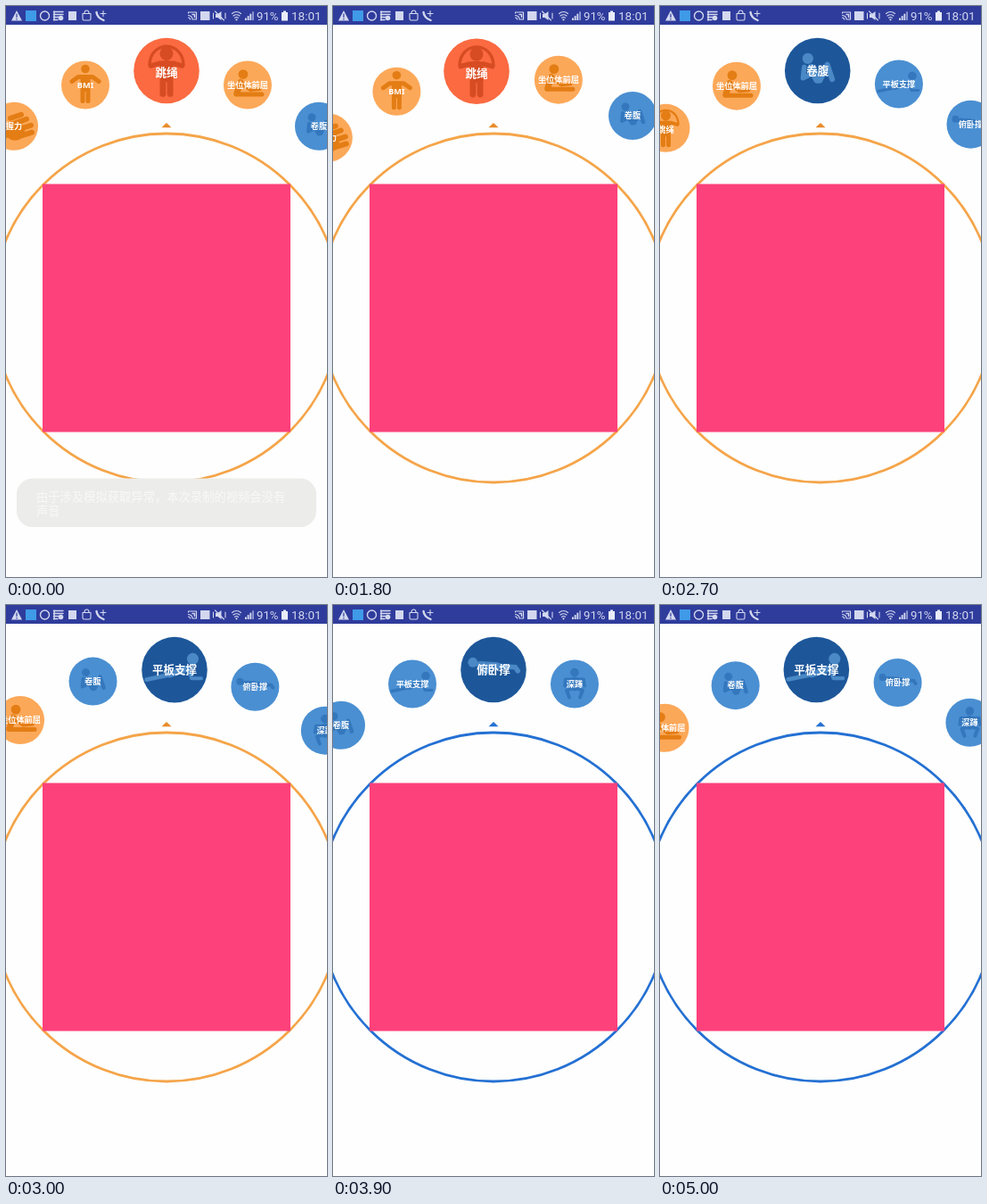
Animation of 360 by 640 pixels, one loop 5100 ms. Source, as an HTML page with a canvas:

```html
<!DOCTYPE html>
<html lang="zh">
<head>
<meta charset="utf-8">
<style>
html, body { margin: 0; width: 100%; height: 100%; overflow: hidden; background: #fdfefd; }
canvas { display: block; }
</style>
</head>
<body>
<canvas width="360" height="640"></canvas>
<script>
const ctx = document.querySelector('canvas').getContext('2d');
const LOOP = 5100, STEP = 100;
const CX = 180, CY = 338.5, ORBIT = 266, SPACING = 20 * Math.PI / 180;
const CJK = '"Noto Sans", "Noto Sans CJK SC", "Noto Sans CJK", sans-serif';

const WARM = { normal: ['#fca859', '#e37d14'], active: ['#fb6a41', '#d74c22'] };
const COOL = { normal: ['#4a8fd2', '#3477bd'], active: ['#1d579a', '#4a88c6'] };

// Figures fit a circle of radius 27: head [x, y, r] and strokes [width, path].
const ITEMS = [
  { label: '握力', tone: WARM, head: [1, 5, 11],
    limbs: [[6, 'M-4 -9L8 -13M0 -3L14 -8M4 4L19 -1M7 11L20 7M-14 14L-3 6']] },
  { label: 'BMI', tone: WARM, head: [0, -18, 4.8],
    limbs: [[5, 'M-15 -4L-8 -9H8L15 -4'], [11, 'M0 -6V2'], [5, 'M-3 4V18M3 4V18']] },
  { label: '跳绳', tone: WARM, head: [0, -14, 5.5], labelY: 1.5,
    limbs: [[2.4, 'M-14 -5C-13 -25 13 -25 14 -5'], [4, 'M-13 -4L-6 -6H6L13 -4'],
      [11, 'M0 -3V4'], [5, 'M-3 6V19M3 6V19']] },
  { label: '坐位体前屈', tone: WARM, head: [-5, -12, 5.4],
    limbs: [[7, 'M-8 -3L-12 9'], [5, 'M-13 10.5H16'], [3, 'M-7 -1L3 6L14 5']] },
  { label: '卷腹', tone: COOL, head: [-8, -10, 4.5],
    limbs: [[4, 'M-11 -3L-12 6L-4 2'], [7, 'M-5 -2L0 7'], [4.5, 'M2 8L8 -5L12 7']] },
  { label: '平板支撑', tone: COOL, head: [15, -9, 4.8],
    limbs: [[5, 'M11 -1L-4 4'], [3.5, 'M-4 4L-23 8'], [3, 'M12 0L14 7H22']] },
  { label: '俯卧撑', tone: COOL, head: [-17, -6, 4],
    limbs: [[6, 'M-11 -4L3 -3'], [4, 'M3 -3L18 -2L20 1'], [3, 'M-10 -3L-9 3L-4 1']] },
  { label: '深蹲', tone: COOL, head: [0, -13, 4.8],
    limbs: [[4, 'M-11 2L-10 -5H10L11 2'], [10, 'M0 -3V3'], [4, 'M-3 5L-9 7L-6 15M3 5L9 7L6 15']] }
];

// Wheel position, in items, at chosen times
const KEYS = [[0, 2], [1000, 2], [1800, 2.205], [2300, 2.903], [3000, 4.903],
  [3600, 6], [4100, 6], [4600, 5.48], [5000, 5.05], [5100, 4.95]];

const slope = i => {
  const a = KEYS[i], b = KEYS[i + 1];
  return a && b ? (b[1] - a[1]) / (b[0] - a[0]) : 0;
};
const tangent = i => {
  const a = slope(i - 1), b = slope(i);
  return a * b > 0 ? 2 * a * b / (a + b) : 0;
};

// Monotone cubic interpolation
function wheelPosition(t) {
  let i = 0;
  while (i < KEYS.length - 2 && t >= KEYS[i + 1][0]) i++;
  const [t0, a] = KEYS[i], [t1, b] = KEYS[i + 1];
  const d = t1 - t0, u = (t - t0) / d, u2 = u * u, u3 = u2 * u;
  return a * (2 * u3 - 3 * u2 + 1) + b * (3 * u2 - 2 * u3) +
    d * (tangent(i) * (u3 - 2 * u2 + u) + tangent(i + 1) * (u3 - u2));
}

function disc(x, y, r, color) {
  ctx.fillStyle = color;
  ctx.beginPath();
  ctx.arc(x, y, r, 0, 7);
  ctx.fill();
}

function line(path, color, width) {
  ctx.strokeStyle = color;
  ctx.lineWidth = width;
  ctx.stroke(new Path2D(path));
}

function shape(path, color) {
  ctx.fillStyle = color;
  ctx.fill(new Path2D(path));
}

function text(str, x, y, font, color, align = 'left') {
  ctx.font = font;
  ctx.fillStyle = color;
  ctx.textAlign = align;
  ctx.fillText(str, x, y);
}

function drawStatusBar() {
  const ink = '#d3d8ef', dim = '#8e98cf';
  ctx.fillStyle = '#2f3c9c';
  ctx.fillRect(0, 0, 360, 21);
  shape('M12 5L18 16.5H6Z', ink);
  line('M12 9V12.5M12 14.3V15', '#2f3c9c', 1.2);
  shape('M22 5h12v12h-12z', '#3f9ae8');
  line('M38.5 11a5 5 0 1 0 10 0a5 5 0 1 0 -10 0', ink, 1.4);
  line('M53.5 6.5H64M53.5 9.5H64M53.5 12.5H59M53.5 15.5H58M54 6V16', ink, 1.5);
  disc(61.5, 13.5, 2.8, ink);
  shape('M70 6h9v10h-9z', ink);
  line('M86 8.5H95V14.5Q95 16 93.500 16H87.5Q86 16 86 14.500ZM88 8Q88 5 90.500 5T93 8', ink, 1.1);
  line('M101.5 7Q102 13 109.5 16', ink, 2.4);
  line('M106 8.5H112M109 5.500V11.5', ink, 1.1);
  line('M204.500 8V7H213.5V15H210M204.500 10.500Q209 11 209 15M204.500 13Q206.500 13 206.500 15', ink, 1.2);
  line('M209 9.500H211.5V12.5', ink, 1.5);
  shape('M218 6h10.500v10h-10.500z', ink);
  shape('M235 9h2.500l4-3v10l-4-3h-2.500z', ink);
  line('M234.500 6L244.500 16M232.500 8V14M246 8V14', ink, 1.1);
  line('M253.500 8.500Q258.500 4.500 263.500 8.500M255 11Q258.500 8.500 262 11M256.500 13.200Q258.500 11.800 260.500 13.200', ink, 1.2);
  disc(258.5, 15.300, 1.1, ink);
  for (let i = 0; i < 4; i++) {
    ctx.fillStyle = i < 3 ? ink : dim;
    ctx.fillRect(268 + i * 2.7, 13.500 - i * 2.4, 1.9, 2.5 + i * 2.4);
  }
  text('91%', 281, 16, '13.2px Roboto, sans-serif', ink);
  shape('M309 7h2v-1.500h3v1.500h2v9.500h-7z', '#e9ecf8');
  text('18:01', 320, 16, '13.500px Roboto, sans-serif', ink);
}

function drawItem(item, angle, active) {
  const [fill, figure] = item.tone[active ? 'active' : 'normal'];
  const scale = (active ? 36.8 : 27) / 27;
  ctx.save();
  ctx.translate(CX + ORBIT * Math.sin(angle), CY - ORBIT * Math.cos(angle));
  ctx.scale(scale, scale);
  disc(0, 0, 27, fill);
  disc(...item.head, figure);
  for (const [width, path] of item.limbs) line(path, figure, width);
  text(item.label, 0, 3.3 + (item.labelY || 0), `bold 9.2px ${CJK}`, '#fff', 'center');
  ctx.restore();
}

function drawToast(alpha) {
  ctx.save();
  ctx.globalAlpha = alpha;
  ctx.fillStyle = '#ecedea';
  ctx.beginPath();
  ctx.roundRect(12, 529.5, 336, 54.5, 18);
  ctx.fill();
  const font = `13.300px ${CJK}`;
  text('由于涉及模拟获取异常，本次录制的视频会没有', 34, 555, font, '#f8f9f7');
  text('声音', 34, 571, font, '#f8f9f7');
  ctx.restore();
}

function draw(t) {
  const position = wheelPosition(t);
  const accent = t < 3700 ? '#f5a449' : '#2470d3';
  ctx.fillStyle = '#fdfefd';
  ctx.fillRect(0, 0, 360, 640);
  ctx.lineCap = ctx.lineJoin = 'round';
  drawStatusBar();

  ctx.strokeStyle = accent;
  ctx.lineWidth = 2.8;
  ctx.beginPath();
  ctx.arc(CX, CY, 195.5, 0, 7);
  ctx.stroke();
  shape('M180 131L185.500 136.300H174.500Z', t < 3700 ? '#e88b2b' : '#2470d3');
  ctx.fillStyle = '#fd417b';
  ctx.fillRect(41, 199.5, 278, 278);

  ITEMS.forEach((item, i) => {
    const offset = i - position;
    if (Math.abs(offset) < 3) drawItem(item, offset * SPACING, i === Math.round(position));
  });
  if (t < 600) drawToast(1 - t / 600);
}

const start = performance.now();
function frame() {
  const t = (performance.now() - start) % LOOP;
  draw(Math.floor(t / STEP) * STEP);
  requestAnimationFrame(frame);
}
frame();
</script>
</body>
</html>
```
